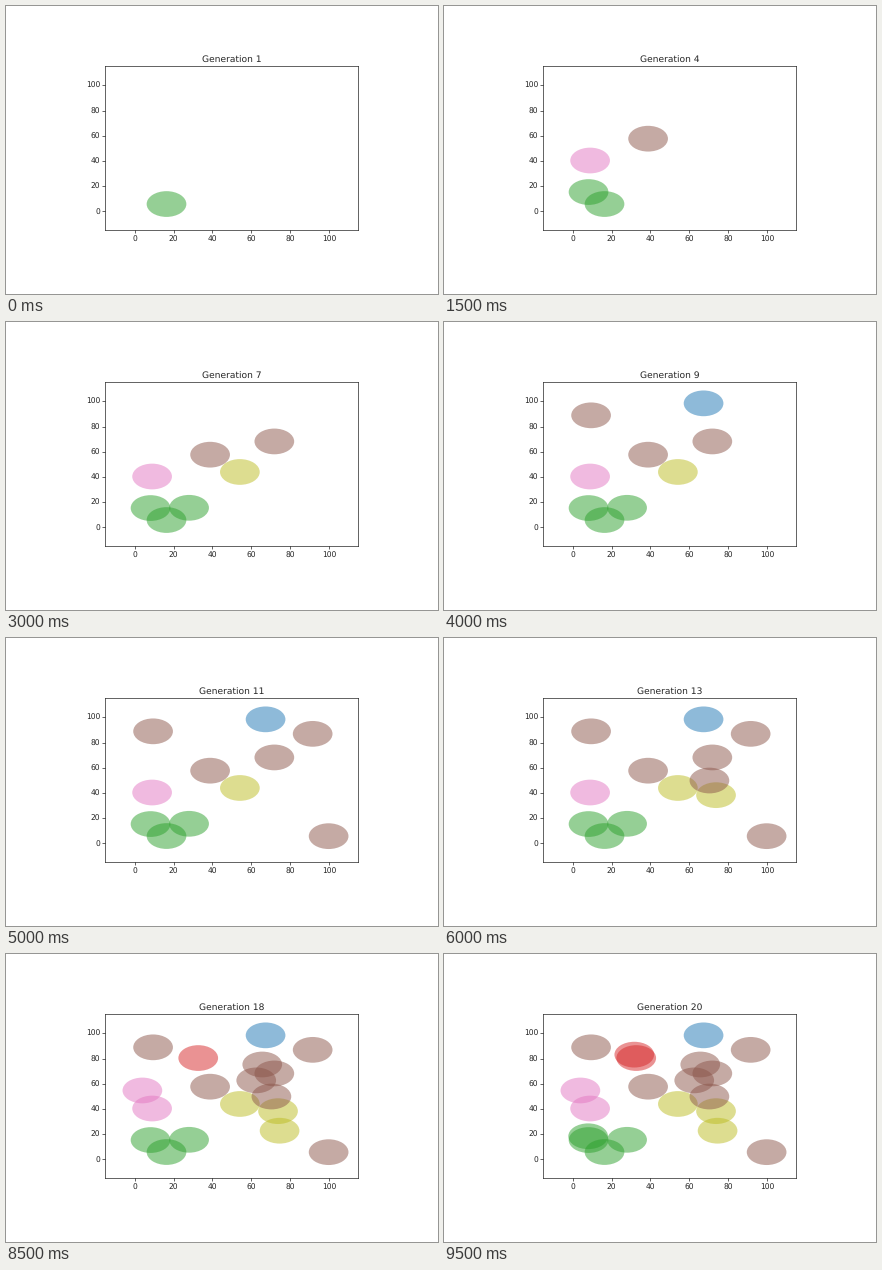
A matplotlib script that plays this animation: 432 by 288 pixels, repeating every 10000 ms.

```python
import matplotlib.pyplot as plt
from matplotlib.animation import FuncAnimation

WIDTH, HEIGHT, DPI = 432, 288, 72
SCALE = 0.7557
RADIUS = 10.2

plt.rcParams.update({
    "font.family": "DejaVu Sans",
    "font.size": 10 * SCALE,
    "text.hinting": "none",
    "text.color": "0.15",
    "axes.titlesize": 12 * SCALE,
    "axes.titlepad": 6 * SCALE,
    "axes.linewidth": 0.8 * SCALE,
})

# One circle joins per generation: x, y, colour
CIRCLES = [
    (16.4, 5.9, "tab:green"),
    (8.2, 15.4, "tab:green"),
    (38.8, 57.7, "tab:brown"),
    (9.0, 40.4, "tab:pink"),
    (28.0, 15.6, "tab:green"),
    (54.1, 44.0, "tab:olive"),
    (71.8, 68.2, "tab:brown"),
    (9.5, 88.9, "tab:brown"),
    (67.3, 98.4, "tab:blue"),
    (91.5, 86.9, "tab:brown"),
    (99.7, 5.8, "tab:brown"),
    (73.7, 38.3, "tab:olive"),
    (70.3, 49.9, "tab:brown"),
    (4.0, 54.7, "tab:pink"),
    (62.5, 62.7, "tab:brown"),
    (65.6, 75.3, "tab:brown"),
    (74.5, 22.8, "tab:olive"),
    (32.7, 80.4, "tab:red"),
    (8.0, 18.4, "tab:green"),
    (31.7, 83.1, "tab:red"),
]

fig = plt.figure(figsize=(WIDTH / DPI, HEIGHT / DPI), dpi=DPI, facecolor="white")
ax = fig.add_axes([99.4 / WIDTH, 63.6 / HEIGHT, 253 / WIDTH, 164 / HEIGHT])
ax.set(xlim=(-15, 115), ylim=(-15, 115),
       xticks=range(0, 101, 20), yticks=range(0, 101, 20))
ax.tick_params(length=3.5 * SCALE, width=0.8 * SCALE, pad=3.5 * SCALE,
               labelsize=10 * SCALE, labelcolor="0.15")
title = ax.set_title("Generation 1")

patches = [
    ax.add_patch(plt.Circle((x, y), RADIUS, color=color, alpha=0.5, linewidth=0))
    for x, y, color in CIRCLES
]


def update(frame):
    title.set_text(f"Generation {frame + 1}")
    for i, patch in enumerate(patches):
        patch.set_visible(i <= frame)
    return [title, *patches]


anim = FuncAnimation(fig, update, frames=len(CIRCLES), interval=500,
                     repeat=True, repeat_delay=0, blit=False)
plt.show()
```
